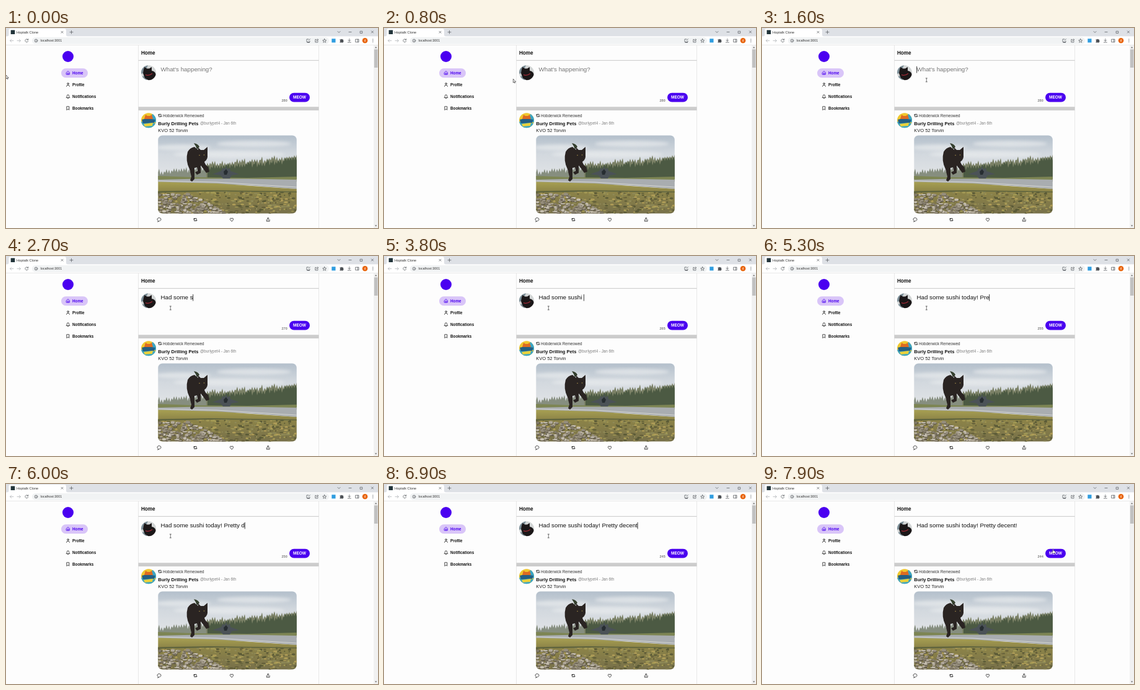
Recreate the animation shown at these times as an HTML page. Size 600 by 323 pixels, loop 8 s.

```html
<!DOCTYPE html>
<html lang="en">
<head>
<meta charset="utf-8">
<title>Hoptalk Clone</title>
<style>
html, body { margin: 0; height: 100%; overflow: hidden; background: #fdfdfd; }
svg { display: block; width: 100vw; height: 100vh; }
text { font-family: "Liberation Sans", Arial, sans-serif; white-space: pre; }
.b { font-weight: bold; }
.line { fill: none; stroke: #222; stroke-width: .8; stroke-linecap: round; stroke-linejoin: round; }
.ui { stroke: #5f6368; }
.faint { stroke: #b5b8bb; }
.accent { stroke: #4a00f0; }
</style>
</head>
<body>
<svg viewBox="0 0 600 323">
  <defs>
    <linearGradient id="sky" x2="0" y2="1">
      <stop stop-color="#b3bfcb"/><stop offset=".4" stop-color="#d2d8de"/><stop offset="1" stop-color="#e4e6e8"/>
    </linearGradient>
    <linearGradient id="grass" x2="0" y2="1">
      <stop stop-color="#a7a052"/><stop offset=".3" stop-color="#8d8448"/><stop offset="1" stop-color="#77704a"/>
    </linearGradient>
    <filter id="soft"><feGaussianBlur stdDeviation="2.500"/></filter>
    <clipPath id="photo"><rect x="245.3" y="173.5" width="223.5" height="126" rx="7"/></clipPath>
    <clipPath id="me"><circle cx="230" cy="72.3" r="12"/></clipPath>
    <clipPath id="poster"><circle cx="230" cy="149.3" r="12"/></clipPath>
    <path id="loop" d="M-2.900-.9L-1.800-2L-.7-.9M-1.800-1.900V2H.8M2.900 .9L1.800 2L.7 .9M1.800 1.900V-2H-.8"/>
  </defs>

  <!-- browser window -->
  <rect width="600" height="14" fill="#dee1e6"/>
  <path d="M2 13.5Q4.500 13.500 4.500 10.500V4Q4.500 1 7.500 1H94Q97 1 97 4V10.500Q97 13.500 99.500 13.500V14H2Z" fill="#fff"/>
  <rect y="13.400" width="600" height="14.300" fill="#fff"/>
  <rect x="42" y="15" width="479" height="11" rx="5.500" fill="#f1f3f4"/>
  <rect y="27.300" width="600" height=".6" fill="#dcdcdc"/>
  <rect x="7.700" y="3.400" width="6.600" height="6.600" fill="#22343a"/>
  <text x="17" y="9" font-size="5.600" fill="#333">Hoptalk Clone</text>
  <text x="55.500" y="22.400" font-size="5.400" fill="#333">localhost:3001</text>
  <g class="line ui">
    <path d="M89 5.200L92 8.200M92 5.200L89 8.200M103 6.700H108M105.500 4.200V9.200"/>
    <path d="M535 5.500L537 7.500L539 5.500M553 6.500H557M571.500 5.200H574.700V8.400H571.500ZM589.300 4.800L592.500 8M592.500 4.800L589.300 8"/>
    <path class="faint" d="M12 20.500H6.500M8.800 18.200L6.500 20.500L8.800 22.800M18 20.500H23.500M21.200 18.200L23.500 20.500L21.200 22.800"/>
    <path d="M35.500 19A2.500 2.500 0 1 0 35.700 21.400M35.800 17.600V19.300H34"/>
    <circle cx="48.500" cy="20.500" r="2.400"/><path d="M48.500 20.300V21.700M48.500 19.100V19.150"/>
    <path d="M488 18H485V22.500H490V21M488 20.200L490.500 17.700M486 23.500H489.500"/>
    <path d="M500.500 18.500H498.800V23H503V21.500M500.500 21Q500.500 19 503.500 19M502.300 17.700L503.700 19L502.300 20.300"/>
    <path d="M513.700 17.600L514.600 19.600L516.700 19.800L515.100 21.200L515.600 23.300L513.700 22.200L511.800 23.300L512.300 21.200L510.700 19.800L512.800 19.600Z"/>
    <path d="M553.800 17.500V21.300M552 19.600L553.800 21.400L555.600 19.600M551.300 23.200H556.300"/>
    <path d="M564 18.200H569V22.800H564ZM567.300 18.200V22.800"/>
  </g>
  <rect x="525.300" y="17.300" width="6.200" height="6.200" fill="#2f9de0"/>
  <path d="M538.500 18.500H540.200A1.100 1.100 0 0 1 542.300 18.500H544V20.200A1.100 1.100 0 0 1 544 22.200V23.500H538.500V21.900A1 1 0 0 0 538.500 20Z" fill="#4d5156"/>
  <circle cx="579" cy="20.300" r="4.300" fill="#e8650b"/>
  <text x="577.700" y="22" font-size="4.500" fill="#fff">d</text>
  <g fill="#5f6368"><circle cx="591.800" cy="18.200" r=".65"/><circle cx="591.800" cy="20.400" r=".65"/><circle cx="591.800" cy="22.600" r=".65"/></g>

  <!-- scrollbar -->
  <rect x="593" y="28" width="7" height="295" fill="#f1f1f1"/>
  <rect x="593.900" y="34.500" width="5.600" height="29.500" fill="#c1c1c1"/>
  <path d="M594.900 32.300L596.600 30.300L598.300 32.300ZM594.900 318.500L596.600 320.500L598.300 318.500Z" fill="#666"/>

  <!-- sidebar -->
  <circle cx="100" cy="46" r="9" fill="#4a00f0"/>
  <rect x="89" y="65.300" width="43" height="15" rx="7.500" fill="#d9c5f8"/>
  <g class="b" font-size="6.300" fill="#111">
    <text x="107" y="75.100" fill="#4a00f0">Home</text>
    <text x="107" y="94.400">Profile</text>
    <text x="107" y="113.400">Notifications</text>
    <text x="107" y="132.400">Bookmarks</text>
  </g>
  <g class="line">
    <path class="accent" d="M97.500 71.800L100 69.600L102.500 71.800V75H97.500ZM99.200 75V72.800H100.800V75"/>
    <circle cx="100" cy="90" r="1.300"/><path d="M97.500 94.300Q97.600 92.300 100 92.300T102.500 94.300"/>
    <path d="M97.400 112.300Q98.400 111.500 98.400 109.700Q98.400 107.800 100 107.800T101.600 109.700Q101.600 111.500 102.600 112.300ZM99.500 113.600H100.500"/>
    <path d="M98.200 126.800H101.800V132.300L100 130.800L98.200 132.300Z"/>
  </g>

  <!-- composer -->
  <path d="M213.500 28V323M504.500 28V323" stroke="#e2e2e2" stroke-width=".8"/>
  <text class="b" x="218" y="43" font-size="8.150" fill="#111">Home</text>
  <rect x="213.500" y="51.800" width="291" height="1" fill="#c8c8c8"/>
  <rect x="213.500" y="127.300" width="291" height="5.800" fill="#ccc"/>
  <g clip-path="url(#me)">
    <rect x="218" y="60" width="24" height="25" fill="#d3d6d6"/>
    <path d="M218 60H229L224 72L218 74ZM218 79L226 76L228 85H218Z" fill="#7d8f98"/>
    <path d="M222 67L223.500 63L227 65.500H231L235 63V69Q241 70 242 76L239 83L231 85L224 81L221 73Z" fill="#1b1718"/>
    <path d="M225 75.500Q230 78 236 73.500" fill="none" stroke="#a32a36" stroke-width="1.200"/>
  </g>
  <text id="draft" x="249.500" y="70.200" font-size="9.750"></text>
  <rect id="caret" y="61.800" width=".8" height="10.800" fill="#111"/>
  <text id="left" class="b" x="444.500" y="118.500" font-size="5.600" fill="#808080"></text>
  <rect x="457" y="104.700" width="33" height="14.800" rx="7.400" fill="#4a00f0"/>
  <text class="b" x="463" y="114.400" font-size="6.500" fill="#fff">MEOW</text>

  <!-- post -->
  <use href="#loop" class="line" x="248.300" y="141.300"/>
  <text x="253" y="143.600" font-size="6.300" fill="#333">Hobderwick Remeowed</text>
  <text class="b" x="245.300" y="156.700" font-size="7.500" fill="#111">Burly Drilling Pets</text>
  <text x="313" y="156.100" font-size="6.280" fill="#808080">@burlypet4 - Jan 6th</text>
  <text x="245.300" y="168" font-size="7.470" fill="#222">KVO 52 Torvin</text>
  <g clip-path="url(#poster)">
    <rect x="218" y="137" width="24" height="25" fill="#f0c72e"/>
    <path d="M236 137H242V153L234 150ZM218 151L242 154V162H218Z" fill="#3aa5c6"/>
    <path d="M219 148L227 146L241 148L239 153L221 154Z" fill="#245f83"/>
    <path d="M223 147L225 140L228 142H232L235 140L237 147Z" fill="#dd6b22"/>
    <path d="M222 155L237 153L236 158L224 159Z" fill="#ead13c"/>
  </g>

  <g clip-path="url(#photo)">
    <rect x="245" y="173" width="224" height="75" fill="url(#sky)"/>
    <g filter="url(#soft)" fill="#e8ebed" opacity=".7">
      <ellipse cx="285" cy="193" rx="45" ry="5"/><ellipse cx="400" cy="187" rx="60" ry="5"/><ellipse cx="360" cy="204" rx="90" ry="6"/>
    </g>
    <path id="farTrees" fill="#868e7f"/>
    <path id="paleTrees" fill="#7b8166"/>
    <path id="trees" fill="#4c5a43"/>
    <path d="M245 239L300 241L390 242L469 240V248H245Z" fill="#7d8553"/>
    <path d="M245 245L310 243.500H390L469 245V260L390 254L245 249Z" fill="#a9adb0"/>
    <path d="M245 247L340 249L469 257" fill="none" stroke="#e1e1dd" stroke-width=".8"/>
    <path d="M245 248.500L340 251L469 260V300H245Z" fill="url(#grass)"/>
    <g id="tufts"></g>
    <path d="M245 263.500L330 262L469 264V265.500L340 264L245 266Z" fill="#5f643e"/>
    <g id="rocks"></g>
    <path d="M333 236L347 231L350 226L353 228L355 223L357 228L361 226L362 231L376 236L364 238L361 243H350L346 238Z" fill="#4b5257"/>
    <path d="M351 232L355 228L358 232L356 237H352Z" fill="#272d31"/>
    <path d="M303 186Q310 187 312 192L308 196Q306 190 303 186Z" fill="#35402f"/>
    <path d="M293 200Q297 193 304 192L310 197L309 192L314 197H319L325 192V205Q326 212 320 216Q321 221 326 224L328 232L323 234L318 227L314 222L314 234L308 237L305 233L309 231L308 225L304 226L304 244L300 248L297 246L299 240L296 228Q289 214 293 200Z" fill="#2a2422"/>
    <g fill="#a58f4b"><circle cx="312" cy="205.500" r=".8"/><circle cx="319.500" cy="205" r=".8"/></g>
  </g>
  <g class="line">
    <path d="M245.300 311.300A3 2.600 0 1 1 247.300 311.700L245 312.900Z"/>
    <use href="#loop" x="305.300" y="309.500"/>
    <path d="M364 312.200L361.600 309.700Q360.800 308.200 362 307.300Q363.200 306.700 364 308Q364.800 306.700 366 307.300Q367.200 308.200 366.400 309.700Z"/>
    <path d="M422.700 310.700V306.500M421.200 307.900L422.700 306.400L424.200 307.900M420.300 309.400V312.200H425.100V309.400"/>
  </g>

  <!-- pointers, hot spot at the origin -->
  <g id="arrow"><path d="M0 0V6L1.400 4.800L2.300 6.700L3.200 6.300L2.300 4.400H4.200Z" fill="#fff" stroke="#111" stroke-width=".6"/></g>
  <g id="beam"><path class="line" d="M-1.200-2.900H1.200M0-2.900V2.900M-1.200 2.900H1.200" stroke-opacity=".75"/></g>
  <g id="hand"><path d="M-.6 0Q0-.8 .6 0V2.300L3 2.900Q3.700 3.100 3.500 4L3 6.500H-.5L-2.300 4Q-2.200 3-.6 4Z" fill="#fff" stroke="#222" stroke-width=".5"/></g>
</svg>
<script>
const $ = id => document.getElementById(id);
const LOOP = 8000, LIMIT = 280, CLICK = 1500;
const MESSAGE = "Had some sushi today! Pretty decent!";
// [time, characters typed] and [time, x, y]
const typing = [[1750, 0], [2700, 10], [3750, 15], [4600, 20], [6000, 30], [7000, 36]];
const moves = [[100, 0, 76], [1100, 265.3, 84], [7200, 265.3, 84], [7800, 469.5, 105.5]];

let seed = 7;
const rand = () => (seed = seed * 16807 % 2147483647) / 2147483647;
const pick = list => list[Math.floor(rand() * list.length)];

function treeLine(id, x, end, top, base, rise) {
  let d = `M${x} ${base}`;
  for (const start = x; x < end; x += 4) {
    const y = top - rise * (x - start) / (end - start) - rand() * 7;
    d += `L${x} ${y + 6}L${x + 2} ${y}`;
  }
  $(id).setAttribute("d", d + `L${end} ${base}Z`);
}
treeLine("farTrees", 241, 345, 234, 244, 8);
treeLine("paleTrees", 323, 473, 222, 244, 14);
treeLine("trees", 325, 473, 227, 244, 14);

const blob = (x, y, rx, ry, fill) =>
  `<ellipse cx="${x}" cy="${y}" rx="${rx}" ry="${ry}" fill="${fill}"/>`;

let tufts = "", rocks = "";
for (let i = 0; i < 380; i++) {
  const tone = pick(["#a39a55", "#655f3a", "#8f8a58", "#595936", "#b09d58"]);
  tufts += blob(245 + rand() * 224, 264 + rand() * 36, 1 + rand() * 2.5, .6 + rand(), tone);
}
for (let i = 0; i < 230; i++) {
  const x = 245 + rand() * 112, y = 268 + rand() * 32;
  if (x - 245 > 50 + (y - 268) * 2) continue;
  const rx = 1.5 + rand() * 2.5, ry = 1 + rand() * 1.3;
  rocks += blob(x + .5, y + .9, rx, ry, "#5b5444");
  rocks += blob(x, y, rx, ry, pick(["#b0a898", "#958d7c", "#c5beaf", "#837b69"]));
}
$("tufts").innerHTML = tufts;
$("rocks").innerHTML = rocks;

function track(keys, t, ease = p => p) {
  if (t <= keys[0][0]) return keys[0].slice(1);
  const i = keys.findIndex(k => k[0] >= t);
  if (i < 0) return keys[keys.length - 1].slice(1);
  const [a, b] = [keys[i - 1], keys[i]];
  const p = ease((t - a[0]) / (b[0] - a[0]));
  return a.slice(1).map((v, j) => v + (b[j + 1] - v) * p);
}
const smooth = p => p * p * (3 - 2 * p);

function draw(t) {
  const count = Math.floor(track(typing, t)[0] + 1e-6);
  const draft = $("draft");
  draft.textContent = MESSAGE.slice(0, count);
  const width = count ? draft.getComputedTextLength() : 0;
  if (!count) draft.textContent = "What's happening?";
  draft.setAttribute("fill", count ? "#111" : "#757575");
  $("left").textContent = LIMIT - count;

  const [first, last] = [typing[0][0], typing[typing.length - 1][0]];
  const busy = t >= first && t < last;
  const idle = t < first ? t - CLICK : t - last;
  const lit = t >= CLICK && (busy || idle % 1000 < 500);
  $("caret").setAttribute("x", 249.3 + width);
  $("caret").style.display = lit ? "" : "none";

  const [x, y] = track(moves, t, smooth);
  const kind = x > 457 && y > 104 ? "hand" : x > 248 && y < 98 ? "beam" : "arrow";
  for (const id of ["arrow", "beam", "hand"]) {
    $(id).style.display = id === kind ? "" : "none";
    $(id).setAttribute("transform", `translate(${x} ${y})`);
  }
}

const begin = performance.now();
function frame() {
  draw((performance.now() - begin) % LOOP);
  requestAnimationFrame(frame);
}
frame();
</script>
</body>
</html>
```
